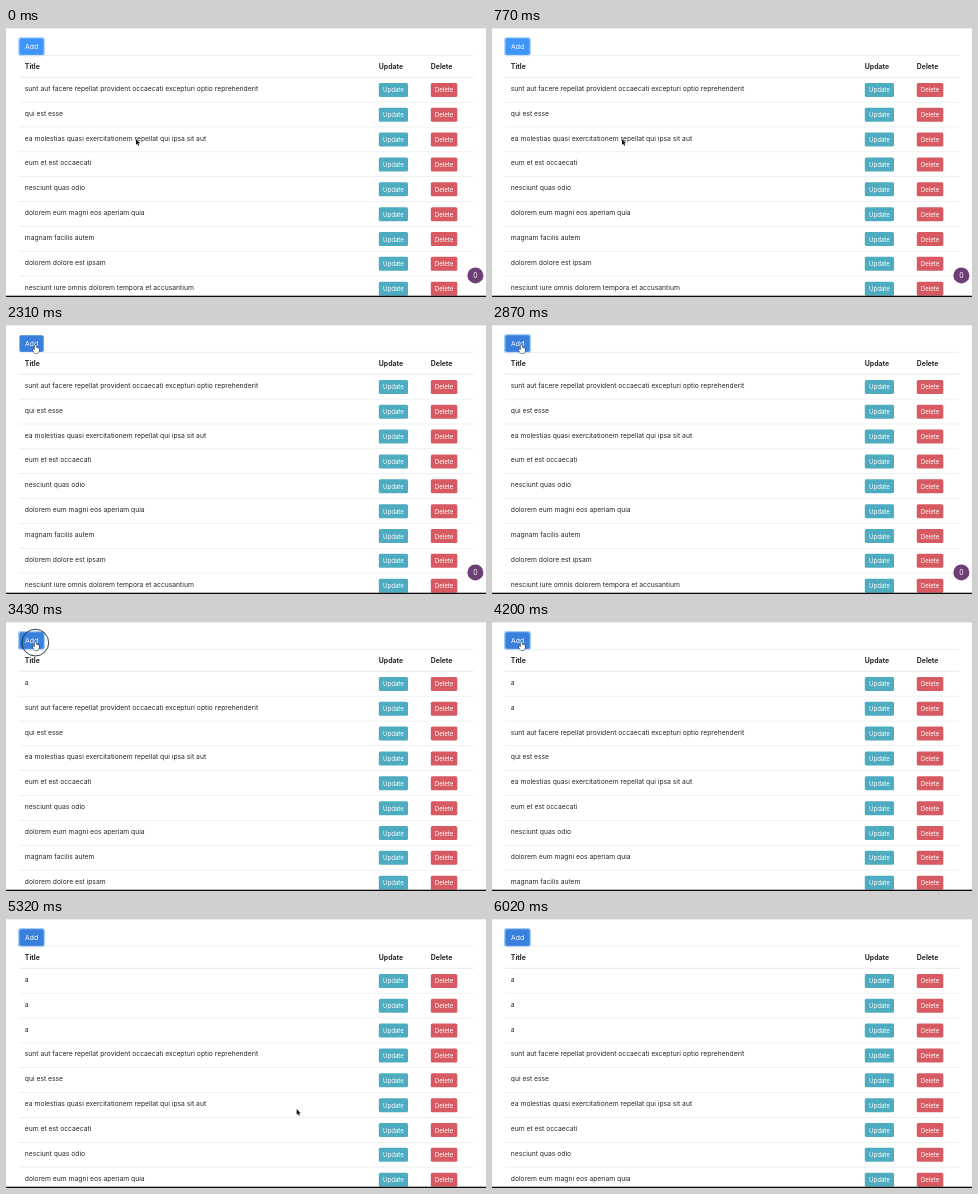
These frames come from a looping animation (480 px wide and 269 px high, 6090 ms). An HTML page with a canvas:

```html
<!DOCTYPE html>
<html lang="en">
<head>
<meta charset="utf-8">
<title>Post list</title>
<style>
html, body { margin: 0; width: 100%; height: 100%; overflow: hidden; background: #fff; }
canvas { display: block; width: 480px; height: 269px; }
</style>
</head>
<body>
<canvas id="stage"></canvas>
<script>
const W = 480, H = 269, LOOP = 6090, STEP = 70;
const ROW_TOP = 49.3, ROW_H = 24.85;
const FONT = 'Inter, Roboto, sans-serif';
const titles = [
  'sunt aut facere repellat provident occaecati excepturi optio reprehenderit',
  'qui est esse',
  'ea molestias quasi exercitationem repellat qui ipsa sit aut',
  'eum et est occaecati',
  'nesciunt quas odio',
  'dolorem eum magni eos aperiam quia',
  'magnam facilis autem',
  'dolorem dolore est ipsam',
  'nesciunt iure omnis dolorem tempora et accusantium'
];
const inserts = [3010, 3850, 4620];
const clicks = [2450, 3290, 3990];

// Pointer keys: time, x, y
const path = [
  [0, 130, 111], [1050, 130, 111], [1610, 34.6, 22], [1820, 34.6, 22],
  [1960, 29.3, 20], [4550, 29.3, 20], [4760, 65, 41.5], [5180, 235, 150], [5600, 402, 270]
];

const canvas = document.getElementById('stage');
const ctx = canvas.getContext('2d');
const dpr = window.devicePixelRatio || 1;
canvas.width = Math.round(W * dpr);
canvas.height = Math.round(H * dpr);

function text(str, x, y, size, color = '#24282c', weight = 400, align = 'left') {
  ctx.font = `${weight} ${size}px ${FONT}`;
  ctx.fillStyle = color;
  ctx.textAlign = align;
  ctx.fillText(str, x, y);
}

function box(x, y, w, h, r, color) {
  ctx.fillStyle = color;
  ctx.beginPath();
  ctx.roundRect(x, y, w, h, r);
  ctx.fill();
}

function line(y, h, color) {
  ctx.fillStyle = color;
  ctx.fillRect(13, y, 454.5, h);
}

function shape(points, fill, stroke, width) {
  ctx.beginPath();
  points.forEach(([x, y]) => ctx.lineTo(x, y));
  ctx.closePath();
  ctx.lineJoin = 'round';
  ctx.lineWidth = width;
  ctx.strokeStyle = stroke;
  ctx.stroke();
  ctx.fillStyle = fill;
  ctx.fill();
}

function addButton(t) {
  const hover = t >= 1960;
  const focus = t < 1680 || t >= 2450;
  if (focus) box(12, 9, 27, 19.3, 2.8, hover ? '#a5cbf7' : '#b9d9ff');
  box(13.4, 10.3, 24.3, 16.7, 1.8, hover ? '#397fdc' : '#4095fb');
  text('Add', 25.6, 21.3, 6.8, '#fff', 400, 'center');
}

function table(t) {
  line(26.9, 0.6, '#e3e6e9');
  line(48.8, 0.9, '#e3e6e9');
  text('Title', 18.8, 40.7, 6.9, '#24282c', 700);
  text('Update', 372.8, 40.7, 6.9, '#24282c', 700);
  text('Delete', 424.8, 40.7, 6.9, '#24282c', 700);
  const added = inserts.filter(time => t >= time).length;
  const rows = [...Array(added).fill('a'), ...titles].slice(0, 9);
  rows.forEach((title, i) => {
    const y = ROW_TOP + i * ROW_H;
    if (i) line(y - 0.3, 0.6, '#e3e6e9');
    text(title, 18.8, y + 13.5, 6.76);
    box(372.8, y + 5.6, 29.2, 14, 1.5, '#4eacc1');
    text('Update', 387.4, y + 15.1, 6.1, '#fff', 400, 'center');
    box(424.8, y + 5.6, 26.5, 14, 1.5, '#d75a62');
    text('Delete', 438, y + 15.1, 6.1, '#fff', 400, 'center');
  });
}

function badge() {
  ctx.fillStyle = '#6e3f76';
  ctx.beginPath();
  ctx.arc(469.4, 247.4, 8, 0, Math.PI * 2);
  ctx.fill();
  text('0', 469.4, 249.9, 6.9, '#fff', 400, 'center');
}

function pointerAt(t) {
  const i = path.findIndex(key => key[0] > t);
  if (i < 0) return null;
  const [t0, x0, y0] = path[i - 1], [t1, x1, y1] = path[i];
  let p = (t - t0) / (t1 - t0);
  if (t1 === 1610) p = p * p * (3 - 2 * p);
  return [x0 + (x1 - x0) * p, y0 + (y1 - y0) * p];
}

function ring(x, y, r) {
  ctx.beginPath();
  ctx.arc(x, y, r, 0, Math.PI * 2);
  ctx.lineWidth = 0.9;
  ctx.strokeStyle = '#20262e';
  ctx.stroke();
}

function arrow() {
  shape([[0, 0], [0, 5.8], [1.3, 4.7], [2.2, 6.7], [3.2, 6.3], [2.3, 4.3], [4.1, 4.2]],
    '#111', '#fff', 0.8);
}

function hand() {
  shape([[-0.7, 0.3], [0.2, -0.1], [0.8, 0.5], [1, 2.6], [2.7, 3], [3.8, 3.7], [3.8, 5.6],
    [3, 8], [-0.7, 8], [-2.7, 5.1], [-2.2, 4.2], [-0.7, 5]], '#fff', '#1b2532', 1);
}

function pointer(t) {
  const pos = pointerAt(t);
  if (!pos) return;
  const [x, y] = pos;
  if (t >= 1680 && t < 1820) ring(x, y, 9.7 + (t - 1680) / 40);
  clicks.forEach(time => {
    const age = t - time;
    if (age >= 0 && age < 210) ring(x, y + 0.6, 8.2 + age / 27);
  });
  ctx.save();
  ctx.translate(x, y);
  if (t >= 1960 && t < 4620) hand();
  else arrow();
  ctx.restore();
}

function draw(t) {
  ctx.setTransform(dpr, 0, 0, dpr, 0, 0);
  ctx.fillStyle = '#fff';
  ctx.fillRect(0, 0, W, H);
  ctx.fillStyle = '#e6e6e6';
  ctx.fillRect(0, 0, W, 0.7);
  addButton(t);
  table(t);
  if (t < inserts[0]) badge();
  pointer(t);
  ctx.fillStyle = '#0b0b0b';
  ctx.fillRect(0, 267.7, W, 1.3);
}

const start = performance.now();
function tick(now) {
  const t = Math.max(0, now - start) % LOOP;
  draw(Math.floor(t / STEP) * STEP);
  requestAnimationFrame(tick);
}
draw(0);
requestAnimationFrame(tick);
</script>
</body>
</html>
```
